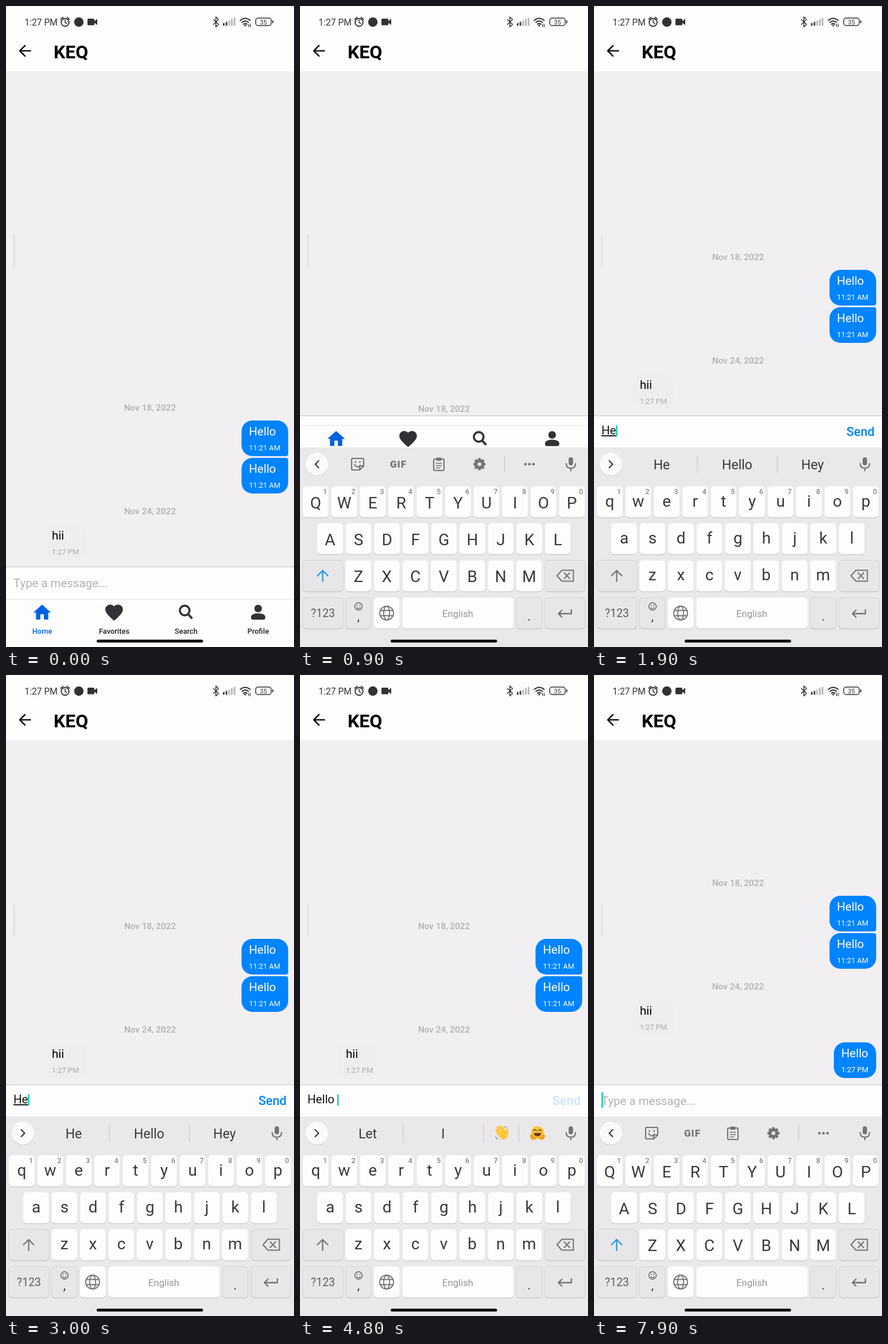
Recreate the animation shown at these times as an HTML page. Size 502 by 1115 pixels, loop 8000 ms.

```html
<!DOCTYPE html>
<html lang="en">
<head>
<meta charset="utf-8">
<title>Chat</title>
<style>
html, body { margin: 0; width: 100%; height: 100%; overflow: hidden; background: #f1eff2; }
svg { display: block; width: 100vw; height: 100vh; font-family: Roboto, sans-serif; }
text { white-space: pre; }
.mid { text-anchor: middle; }
.line { fill: none; stroke-linecap: round; stroke-linejoin: round; }
</style>
</head>
<body>
<svg id="stage" viewBox="0 0 502 1115" xmlns="http://www.w3.org/2000/svg"></svg>
<script>
const LOOP = 8000, KEYBOARD = 347;
const INK = '#333135', GREY = '#747276', BLUE = '#0084ff';

const rect = (x, y, w, h, fill, r = 0, extra = '') =>
  `<rect x="${x}" y="${y}" width="${w}" height="${h}" rx="${r}" fill="${fill}" ${extra}/>`;
const disc = (x, y, r, fill, extra = '') => `<circle cx="${x}" cy="${y}" r="${r}" fill="${fill}" ${extra}/>`;
const ring = (x, y, r, color, w) => disc(x, y, r, 'none', `stroke="${color}" stroke-width="${w}"`);
const line = (d, color, w, extra = '') =>
  `<path class="line" d="${d}" stroke="${color}" stroke-width="${w}" ${extra}/>`;
const shape = (d, fill, extra = '') => `<path d="${d}" fill="${fill}" ${extra}/>`;
const label = (x, y, str, size, fill, extra = '') =>
  `<text x="${x}" y="${y}" font-size="${size}" fill="${fill}" ${extra}>${str}</text>`;
const mid = (x, y, str, size, fill, weight = 400, extra = '') =>
  label(x, y, str, size, fill, `class="mid" font-weight="${weight}" ${extra}`);
const group = (id, body, extra = '') => `<g id="${id}" ${extra}>${body}</g>`;

function statusBar() {
  const bars = [5, 7, 9, 12, 14].map((h, i) =>
    rect(378 + i * 4.7, 34.5 - h, 3, h, i < 2 ? '#4a484c' : '#b9b7ba', 1)).join('');
  return label(32.5, 33.5, '1:27 PM', 15.6, INK) +
    ring(103, 28.5, 6.8, INK, 1.9) + line('M103 24.5v4.2l2.8 1.8', INK, 1.6) +
    line('M95.5 23l4-3.4M110.500 23l-4-3.400', INK, 1.9) +
    disc(127, 28, 8.2, INK) +
    rect(142, 22, 12, 11.5, INK, 1.5) + shape('M153 27l6-4.500v10.500l-6-4.500z', INK) +
    line('M361.500 23.500l9 8.500-4.700 4.500V19l4.700 4.500-9 8.500', INK, 1.5) + bars +
    line('M408.500 25q8.500-7 17 0M411.300 28.500q5.700-4.600 11.400 0M414 31.700q3-2.300 6 0', INK, 2.1) +
    disc(417, 34, 1.6, INK) + line('M423 32v4M425.800 32v4', INK, 1.3) +
    rect(435.300, 21, 27, 13, 'none', 4, `stroke="${INK}" stroke-width="1.5"`) +
    rect(464, 25, 2, 5, INK, 1) + mid(448.800, 31.600, '35', 11, INK);
}

function header() {
  return rect(0, 0, 502, 113.5, '#fefdfe') + statusBar() +
    line('M42.500 78H24.500M33 69l-9 9 9 9', '#111', 2.5) +
    label(83, 91, 'KEQ', 32, '#000', 'font-weight="700"');
}

// Rounded box with its own radius for the two right corners
function bubble(x, y, w, tr, br, fill) {
  const h = 62, r = 19;
  return shape(`M${x + r} ${y}h${w - r - tr}a${tr} ${tr} 0 0 1 ${tr} ${tr}v${h - tr - br}` +
    `a${br} ${br} 0 0 1 ${-br} ${br}h${r + br - w}a${r} ${r} 0 0 1 ${-r} ${-r}v${2 * r - h}` +
    `a${r} ${r} 0 0 1 ${r} ${-r}z`, fill);
}
function message(x, y, w, str, time, own, tr = 19, br = 19) {
  return bubble(x, y, w, tr, br, own ? BLUE : '#eeedef') +
    label(x + 13, y + 26, str, 20.45, own ? '#fff' : '#000') +
    label(x + 13, y + 52, time, 12.8, own ? '#fff' : '#aaa8ab');
}
function chat() {
  return mid(251, 704, 'Nov 18, 2022', 15.3, '#b1afb2', 500) +
    message(410.500, 721, 81.300, 'Hello', '11:21 AM', true, 19, 4) +
    message(410.500, 786, 81.300, 'Hello', '11:21 AM', true, 4, 19) +
    mid(251, 884, 'Nov 24, 2022', 15.3, '#b1afb2', 500) +
    message(67, 901.500, 73, 'hii', '1:27 PM', false) +
    group('fresh', message(418, 976, 73.800, 'Hello', '1:27 PM', true));
}

// Drawn with its top edge at y = 0
function inputBar() {
  return rect(0, 0, 502, 57, '#fefdfe') + rect(0, -.5, 502, 1.400, '#d0ced1') +
    group('hint', label(13, 35, 'Type a message...', 20.45, '#b3b1b4')) +
    label(13, 35, '', 20.45, '#111', 'id="typed"') +
    rect(13, 14, 2.7, 27, '#1ecbb8', 0, 'id="caret"') +
    label(489, 35, 'Send', 21.7, BLUE, 'id="send" text-anchor="end" font-weight="500"');
}

// Drawn with its top edge at y = 0
function tabs() {
  const names = ['Home', 'Favorites', 'Search', 'Profile'];
  const scale = x => `transform="translate(${x - 18.4} 5.200) scale(1.53)"`;
  return rect(0, 0, 502, 90, '#fefdfe') + rect(0, -.5, 502, 1.200, '#e6e4e7') +
    shape('M10 20v-6h4v6h5v-8h3L12 3 2 12h3v8z', '#0062e0', scale(63)) +
    shape('M12 21.300C6 16 2 12.300 2 8.500 2 5.400 4.400 3 7.500 3 9.200 3 10.900 3.800 12 5.100 13.100 3.800 14.800 3 16.500 3 19.600 3 22 5.400 22 8.500 22 12.300 18 16 12 21.300z', INK, scale(188.5)) +
    ring(311.500, 20, 8.400, INK, 3.600) + line('M318 27l6.500 7', INK, 4, 'style="stroke-linecap:butt"') +
    disc(439.500, 16.500, 6.600, INK) +
    shape('M427 32c0-5 5-7 12.500-7s12.500 2 12.500 7q0 4-3.500 4h-18q-3.500 0-3.500-4z', INK) +
    names.map((n, i) => mid(63 + i * 125.500, 60, n, 12.9, i ? '#222024' : '#0062e0', 500)).join('');
}

const key = (x, y, w, special) => rect(x, y + 1.200, w, 54, '#c6c4c7', 6) +
  rect(x, y, w, 54, special ? '#e8e6e9' : '#fefdfe', 6,
    special ? 'stroke="#d3d1d4" stroke-width="1"' : '');

const ROWS = [['qwertyuiop', 5, 835.5], ['asdfghjkl', 30, 899.8], ['zxcvbnm', 79.3, 964.2]];
const PITCH = 49.6;

function letters(upper) {
  return ROWS.map(([row, x, y]) => [...row].map((c, i) =>
    mid(x + 22.500 + i * PITCH, y + (upper ? 38 : 35), upper ? c.toUpperCase() : c, 28, '#3a383b')).join('')).join('');
}

function keys() {
  let out = ROWS.map(([row, x, y]) =>
    [...row].map((c, i) => key(x + i * PITCH, y, 44.8)).join('')).join('');
  for (let i = 0; i < 10; i++) out += mid(43.500 + i * PITCH, 849, (i + 1) % 10, 12.5, '#858387', 500);
  out += key(5, 964.2, 70, true) + key(427, 964.2, 70, true);
  [[5, 70, 1], [79.3, 44.8, 1], [128.9, 44.8, 0], [178.3, 194.3, 0], [377, 44.8, 1], [427, 70, 1]]
    .forEach(([x, w, special]) => out += key(x, 1029, w, special));
  out += line('M456.500 981.500H476.500V1000.500H456.500L448 991z', GREY, 2) +
    line('M460.500 986l9.500 10M470 986l-9.500 10', GREY, 2);
  out += mid(40, 1063, '?123', 19.4, '#5f5d61') + mid(275, 1063, 'English', 16.7, '#97959a');
  out += ring(102, 1044.500, 6.500, '#5f5d61', 1.400) + line('M98.800 1046.500q3.200 3.800 6.400 0', '#5f5d61', 1.300) +
    disc(99.700, 1042.700, 1, '#5f5d61') + disc(104.300, 1042.700, 1, '#5f5d61') +
    mid(102, 1069, ',', 22, '#3a383b') + mid(399.500, 1069, '.', 22, '#3a383b');
  out += ring(151, 1056, 12, GREY, 1.900) +
    `<ellipse cx="151" cy="1056" rx="5.200" ry="12" fill="none" stroke="${GREY}" stroke-width="1.8"/>` +
    line('M140 1051.500h22M140 1060.500h22', GREY, 1.800);
  out += line('M473 1050.500v6.500H450.500M456.500 1051l-6 6 6 6', GREY, 2.300);
  return out;
}

function toolbar() {
  const teeth = Array.from({length: 8}, (_, i) =>
    rect(310.400, 786.500, 4.800, 6, GREY, 1, `transform="rotate(${i * 45} 312.800 797)"`)).join('');
  return line('M32.500 791l-6 6 6 6', '#3a383b', 2.200) +
    line('M92 787h17q2 0 2 2v11l-7 7h-12q-2 0-2-2v-16q0-2 2-2zM104 807v-7h7', GREY, 2.100) +
    line('M95 797.500q5.500 8 10 1', GREY, 2) + disc(96.500, 793, 1.500, GREY) + disc(104.500, 793, 1.500, GREY) +
    mid(171.500, 803, 'GIF', 17, GREY, 900, 'letter-spacing="1"') +
    rect(233, 788, 18, 20, 'none', 2, `stroke="${GREY}" stroke-width="2.1"`) +
    rect(237.500, 785.500, 9, 5.500, GREY, 1.500) +
    line('M237.500 795.500h9M237.500 799.500h9M237.500 803.500h6', GREY, 1.700) +
    teeth + ring(312.800, 797, 5.700, GREY, 5) +
    rect(356, 782.500, 1.200, 29, '#c9c7ca') +
    [393, 400, 407].map(x => disc(x, 797, 2.300, GREY)).join('');
}

const hug = disc(414, 796, 11.300, '#ffc83d') +
  line('M407 792.500q2.500-3.500 5 0M416 792.500q2.500-3.500 5 0', '#5c3a1a', 1.700) +
  shape('M407.500 796.500h13q-.5 6-6.500 6t-6.500-6z', '#6b3b1c') +
  shape('M401 800q3-3 6 1t5 3q-1 5-6 4.500t-5-8.500zM427 800q-3-3-6 1t-5 3q1 5 6 4.500t5-8.500z', '#f59f20');
const wave = group('wave', line('M345 798l-2.500-6M348.500 796l-4-9M352.500 794l-4-8.500M356 793l-3.500-6', '#ffc83d', 4) +
  shape('M343 797l13-6 3 3q0-5 2.500-5 2 0 1.500 4l-1 8q-1 6-6 7-5 0-8-4z', '#ffc83d') +
  line('M341 803q1 3.500 4 4.500M356 785q3 1 3.500 3', '#8a8890', 1.300));

function suggestions() {
  const bar = (x, id) => rect(x, 782, 1.200, 30, '#cbc9cc', 0, id ? `id="${id}"` : '');
  return line('M26.500 791l6 6-6 6', '#3a383b', 2.200) + bar(179.500) + bar(319) +
    [118, 249.500, 381].map((x, i) => mid(x, 806, '', 23, '#3a383b', 400, `id="word${i}"`)).join('') +
    group('emoji', bar(380.800) + hug + wave);
}

function keyboard() {
  const mic = rect(468.300, 785, 7.600, 14, GREY, 3.800) +
    line('M464 796q0 8 8.100 8t8.100-8M472.100 804v4.500', GREY, 2.200);
  return rect(0, 768, 502, 348, '#eae8eb') +
    disc(29.500, 798, 20, '#d5d3d6') + disc(29.500, 797, 19.800, '#fbf9fc') + mic +
    group('tools', toolbar()) + group('sugg', suggestions()) + keys() +
    group('upper', letters(true)) + group('lower', letters(false)) +
    line('M39.500 1001V982M30.500 991l9-9 9 9', GREY, 2.200, 'id="shift"');
}

const stage = document.getElementById('stage');
stage.innerHTML = rect(0, 0, 502, 1115, '#f1eff2') +
  rect(11.500, 398, 5, 57, '#e7e5e8', 2) +
  group('chat', chat()) + header() + group('input', inputBar()) + group('tabs', tabs()) +
  group('keyboard', keyboard()) + rect(158, 1102.300, 185.500, 5, '#0a090b', 2.500);

const $ = {};
stage.querySelectorAll('[id]').forEach(el => $[el.id] = el);
const show = (el, on) => el.style.display = on ? '' : 'none';
const moveY = (el, y) => el.setAttribute('transform', `translate(0 ${y})`);
const clamp = v => Math.max(0, Math.min(1, v));

// Text edits; each one restarts the caret blink
const EDITS = [
  {at: 100, text: '', x: 13},
  {at: 1200, text: 'H', x: 27.2, words: ['H', 'Hello', '']},
  {at: 1700, text: 'He', x: 38, words: ['He', 'Hello', 'Hey']},
  {at: 3600, text: 'Hello ', x: 64.8, words: ['Let', 'I', '']},
  {at: 4900, text: '', x: 13}
];

function render(now) {
  const t = Math.floor(now % LOOP / 100) * 100;
  const edit = EDITS.filter(e => e.at <= t).pop();
  const text = edit ? edit.text : '';
  const typing = text !== '';
  const resized = t >= 800, settled = t >= 1000, sent = t >= 5000;

  moveY($.chat, sent ? -337 : settled ? -262 : resized ? 1.5 : 0);
  show($.fresh, sent);
  moveY($.input, resized ? 712.5 : 975.5);
  moveY($.tabs, resized ? 729.5 : 1031.5);
  show($.tabs, !settled);
  const up = 1 - (1 - clamp((t - 200) / 500)) ** 2;
  moveY($.keyboard, (1 - up) * KEYBOARD);

  const sendable = typing && t >= 1400;
  const base = sendable ? 32 : 35;
  show($.hint, !typing);
  $.typed.textContent = text;
  $.typed.setAttribute('y', base);
  $.typed.setAttribute('text-decoration', text.length < 3 ? 'underline' : 'none');
  show($.caret, edit && (t - edit.at) % 1000 < 500);
  if (edit) $.caret.setAttribute('x', edit.x);
  $.caret.setAttribute('y', sendable ? 17 : 13.5);
  $.caret.setAttribute('height', sendable ? 19.5 : 27);
  show($.send, sendable);
  $.send.setAttribute('opacity', 1 - .8 * clamp((t - 4600) / 200));

  show($.tools, !typing);
  show($.sugg, typing);
  show($.upper, !typing);
  show($.lower, typing);
  $.shift.setAttribute('stroke', typing ? GREY : '#2196e3');
  const words = edit && edit.words || ['', '', ''];
  words.forEach((w, i) => $['word' + i].textContent = w);
  show($.emoji, typing && !words[2]);
  show($.wave, text.length > 2);
}

function tick() {
  render(performance.now());
  requestAnimationFrame(tick);
}
tick();
</script>
</body>
</html>
```
